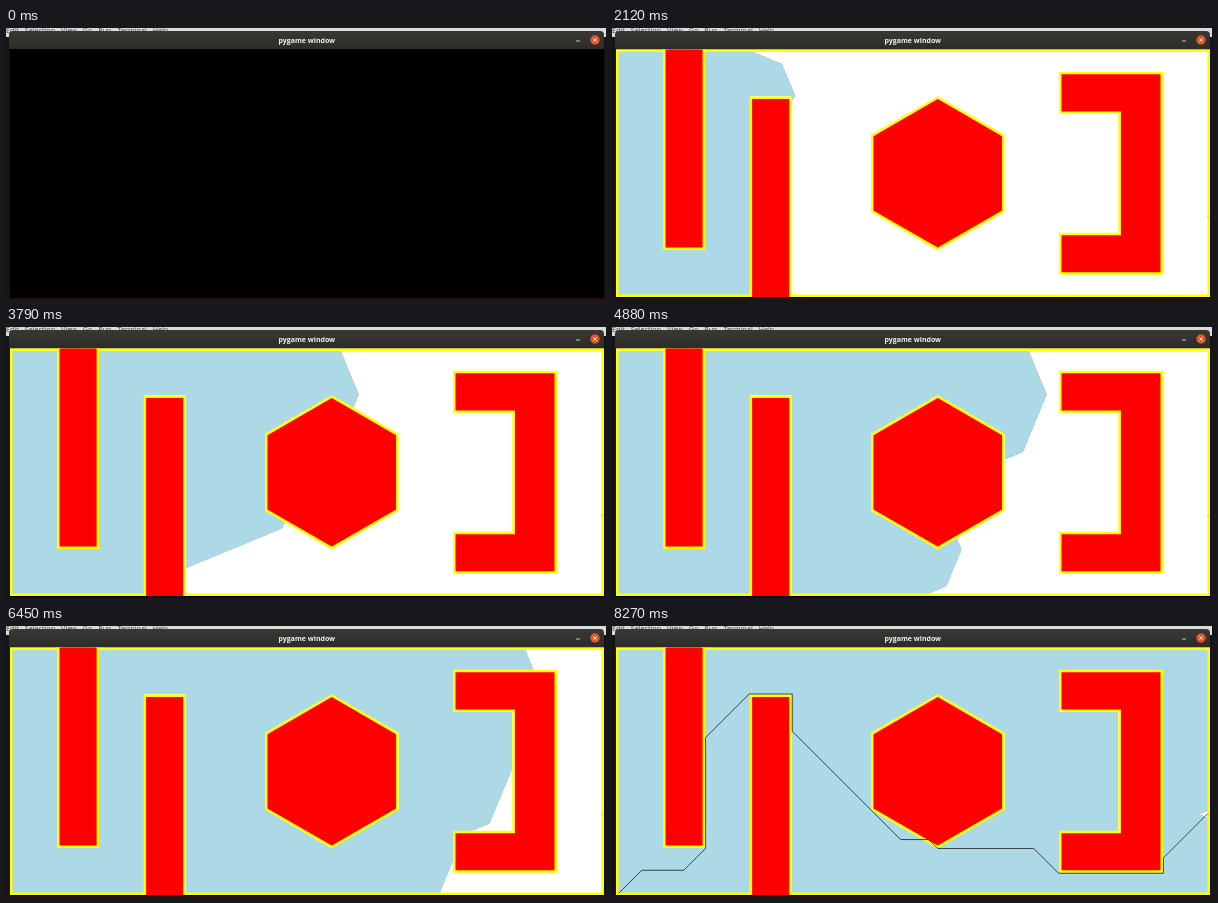
An HTML page with a canvas for the animation above (8.33 s loop, 600 px wide and 271 px high).

```html
<!DOCTYPE html>
<html lang="en">
<head>
<meta charset="utf-8">
<title>Path search</title>
<style>
  html, body { margin: 0; width: 600px; height: 271px; overflow: hidden; background: #111; }
  canvas { display: block; }
</style>
</head>
<body>
<canvas id="stage" width="600" height="271"></canvas>
<script>
const W = 600, H = 271, LOOP = 8330;
const ctx = document.getElementById('stage').getContext('2d');

// The map is 1200 by 500 units with a clearance of 5 around everything
const MAP_W = 1200, MAP_H = 500, GAP = 5;
const SCALE = 0.495, LEFT = 4, TOP = 21.5;
const start = [GAP, MAP_H - GAP], goal = [MAP_W - GAP, 336];

function polygon(points) {
  const path = new Path2D();
  points.forEach(([x, y]) => path.lineTo(x, y));
  path.closePath();
  return path;
}

const pillar = (x, y) => polygon([[x, y], [x + 75, y], [x + 75, y + 410], [x, y + 410]]);

const hexagon = polygon(Array.from({ length: 6 }, (_, i) => {
  const a = Math.PI * (i / 3 + 0.5);
  return [650 + 150 * Math.cos(a), 250 + 150 * Math.sin(a)];
}));

const bracket = polygon([
  [900, 50], [1100, 50], [1100, 450], [900, 450],
  [900, 375], [1020, 375], [1020, 125], [900, 125]
]);

const shapes = [pillar(100, -10), pillar(275, 100), hexagon, bracket];

function inMap(g, draw) {
  g.save();
  g.setTransform(SCALE, 0, 0, SCALE, LEFT, TOP);
  draw();
  g.restore();
}

function drawObstacles(g) {
  inMap(g, () => {
    g.beginPath();
    g.rect(0, 0, MAP_W, MAP_H);
    g.clip();
    g.strokeStyle = '#ff0';
    g.fillStyle = '#f00';
    g.lineWidth = GAP * 2;
    g.strokeRect(0, 0, MAP_W, MAP_H);
    for (const shape of shapes) {
      g.stroke(shape);
      g.fill(shape);
    }
  });
}

const layer = document.createElement('canvas');
layer.width = W;
layer.height = H;
const layerCtx = layer.getContext('2d');

// Dijkstra over pixels with integer costs; 99/70 approximates the square root of two
const STEP = 70, DIAG = 99;

function explore() {
  drawObstacles(layerCtx);
  const mask = layerCtx.getImageData(0, 0, W, H).data;
  const cost = new Int32Array(W * H).fill(1e9);
  const done = new Uint8Array(W * H);
  const buckets = [], order = [], costs = [];
  const push = (cell, c) => {
    cost[cell] = c;
    (buckets[c] = buckets[c] || []).push(cell);
  };
  const [sx, sy] = [LEFT + start[0] * SCALE, TOP + start[1] * SCALE].map(Math.floor);
  push(sy * W + sx, 0);
  for (let c = 0; c < buckets.length; c++) {
    for (const cell of buckets[c] || []) {
      if (done[cell]) continue;
      done[cell] = 1;
      order.push(cell);
      costs.push(c / STEP);
      for (let dy = -1; dy <= 1; dy++) {
        for (let dx = -1; dx <= 1; dx++) {
          const next = cell + dy * W + dx;
          const total = c + (dx && dy ? DIAG : STEP);
          if (mask[next * 4 + 3] < 128 && !done[next] && total < cost[next]) push(next, total);
        }
      }
    }
    buckets[c] = null;
  }
  return { order, costs };
}

const { order, costs } = explore();
const reach = costs[costs.length - 1] - 3;

// Time against search radius; cells are visited at a steady rate in between
const FOUND = 7570;
const pace = [[240, 0], [2135, 326], [3805, 494], [6465, 679], [FOUND, reach]]
  .map(([t, r]) => [t, costs.findIndex(c => c > r)]);

function visitedAt(t) {
  if (t <= pace[0][0]) return 0;
  const i = pace.findIndex(p => p[0] > t);
  if (i < 0) return pace[pace.length - 1][1];
  const [t0, n0] = pace[i - 1], [t1, n1] = pace[i];
  return Math.round(n0 + (n1 - n0) * (t - t0) / (t1 - t0));
}

const image = layerCtx.createImageData(W, H);
let shown = 0;

function drawVisited(n) {
  if (n < shown) {
    image.data.fill(0);
    shown = 0;
  }
  for (; shown < n; shown++) image.data.set([173, 216, 230, 255], order[shown] * 4);
  layerCtx.putImageData(image, 0, 0);
  ctx.drawImage(layer, 0, 0);
}

// Traced back from the goal: between two turns go diagonally first, then straight
const turns = [
  goal, [1106, 456], [894, 456], [650, 406], [575, 388],
  [356, 94], [269, 94], [181, 406], [52, 450], start
];

const route = turns.flatMap(([x, y], i) => {
  if (i === turns.length - 1) return [[x, y]];
  const dx = turns[i + 1][0] - x, dy = turns[i + 1][1] - y;
  const d = Math.min(Math.abs(dx), Math.abs(dy));
  return [[x, y], [x + d * Math.sign(dx), y + d * Math.sign(dy)]];
}).reverse();

function rect(color, x, y, w, h) {
  ctx.fillStyle = color;
  ctx.fillRect(x, y, w, h);
}

function line(color, width, ...points) {
  ctx.strokeStyle = color;
  ctx.lineWidth = width;
  ctx.beginPath();
  points.forEach(([x, y]) => ctx.lineTo(x, y));
  ctx.stroke();
}

function drawRoute(t) {
  const spans = route.slice(1).map(([x, y], i) =>
    Math.max(Math.abs(x - route[i][0]), Math.abs(y - route[i][1])));
  let left = spans.reduce((a, b) => a + b) * Math.min(1, (t - FOUND) / 690);
  if (left <= 0) return;
  const points = [route[0]];
  for (let i = 0; i < spans.length && left > 0; i++) {
    const [ax, ay] = route[i], [bx, by] = route[i + 1];
    const k = spans[i] ? Math.min(1, left / spans[i]) : 1;
    points.push([ax + (bx - ax) * k, ay + (by - ay) * k]);
    left -= spans[i];
  }
  inMap(ctx, () => line('#111', 1.5, ...points));
}

function drawWindow() {
  rect('#141414', 0, 0, W, H);
  rect('#d9dcd8', 0, 0, W, 9);
  ctx.fillStyle = '#444';
  ctx.textAlign = 'left';
  ctx.font = '7.2px "Open Sans", "Noto Sans", sans-serif';
  let x = 0;
  for (const name of ['Edit', 'Selection', 'View', 'Go', 'Run', 'Terminal', 'Help']) {
    ctx.fillText(name, x, 5);
    x += ctx.measureText(name).width + 6;
  }

  const bar = ctx.createLinearGradient(0, 3, 0, 21);
  bar.addColorStop(0, '#383834');
  bar.addColorStop(1, '#2c2d29');
  ctx.fillStyle = bar;
  ctx.beginPath();
  ctx.roundRect(3, 3, 595, 18, [4, 4, 0, 0]);
  ctx.fill();
  ctx.fillStyle = '#f2f2ee';
  ctx.textAlign = 'center';
  ctx.font = 'bold 7px "Open Sans", "Noto Sans", sans-serif';
  ctx.fillText('pygame window', 300.8, 15);

  line('#c8c8c4', 1, [570, 13], [574, 13]);
  ctx.fillStyle = '#e95420';
  ctx.beginPath();
  ctx.arc(589, 12, 4.7, 0, Math.PI * 2);
  ctx.fill();
  line('#fff', 0.9, [587.2, 10.2], [590.8, 13.8]);
  line('#fff', 0.9, [590.8, 10.2], [587.2, 13.8]);

  rect('#000', 4, 21, 594, 249);
  rect('#220a12', 0, 270, W, 1);
}

function drawMap(t) {
  inMap(ctx, () => rect('#fff', 0, 0, MAP_W, MAP_H));
  drawVisited(visitedAt(t));
  drawObstacles(ctx);
  inMap(ctx, () => rect('#8c8c60', goal[0], goal[1], 2, 2));
}

const begin = performance.now();

function frame() {
  const t = (performance.now() - begin) % LOOP;
  drawWindow();
  if (t >= 60) {
    drawMap(t);
    drawRoute(t);
  }
  requestAnimationFrame(frame);
}
frame();
</script>
</body>
</html>
```
